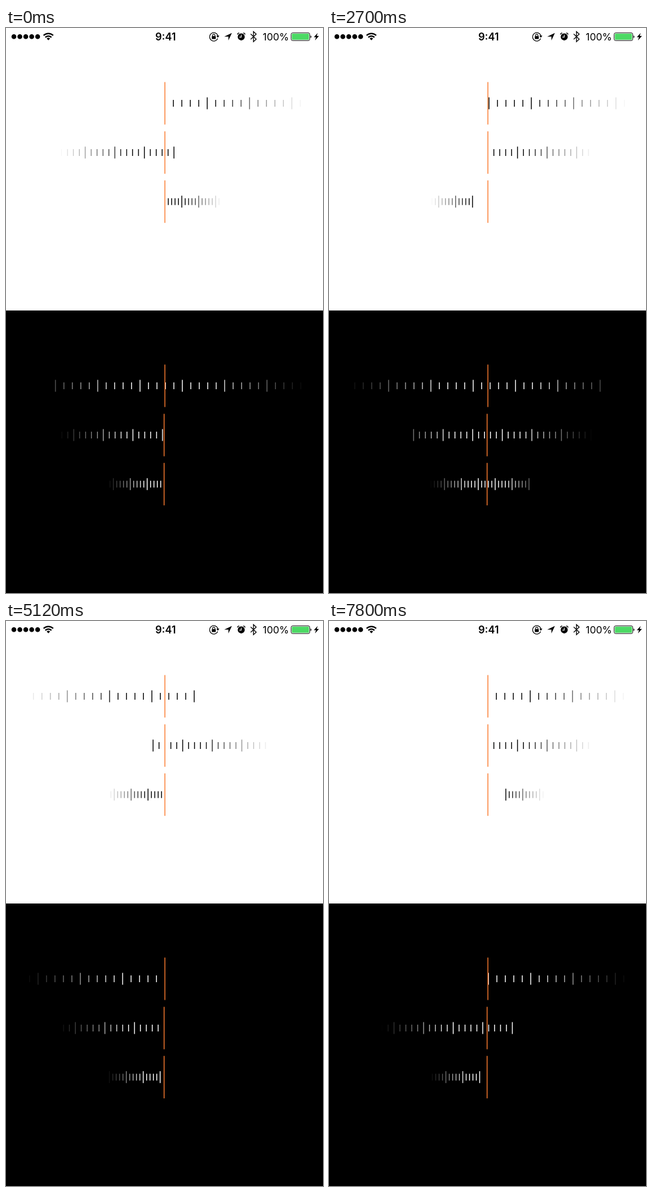
Recreate the animation shown at these times as an HTML page with a canvas. Size 561 by 998 pixels, loop 7900 ms.

```html
<!DOCTYPE html>
<html lang="en">
<head>
<meta charset="utf-8">
<title>Ruler sliders</title>
<style>
  html, body { margin: 0; width: 100%; height: 100%; overflow: hidden; background: #fff; }
  canvas, svg { position: absolute; left: 0; top: 0; display: block; }
  text { font-family: Inter, Roboto, sans-serif; }
</style>
</head>
<body>
<canvas id="stage" width="561" height="998"></canvas>
<svg width="561" height="32" viewBox="0 0 561 32">
  <path d="M14 15.3H57" stroke="#000" stroke-width="8.6" stroke-linecap="round" stroke-dasharray="0 10.5"/>
  <g fill="none" stroke="#000" stroke-width="2.5">
    <path d="M66.5 13.2a12.2 12.2 0 0 1 17 0M69.6 16.5a7.8 7.8 0 0 1 10.8 0"/>
    <path d="M72 18.6a4.5 4.5 0 0 1 6 0L75 21.7Z" fill="#000" stroke="none"/>
  </g>
  <text x="282.5" y="21.8" font-size="18" font-weight="600" text-anchor="middle">9:41</text>
  <!-- rotation lock -->
  <path d="M374.6 18.5A7.4 7.4 0 1 1 375 14" fill="none" stroke="#000" stroke-width="1.2"/>
  <path d="M372.2 13.6h5.4l-2.7 3.6Z"/>
  <rect x="364.2" y="14.2" width="7" height="5.2" rx=".6"/>
  <path d="M365.7 14.5v-1.7a2 2 0 0 1 4 0v1.7" fill="none" stroke="#000" stroke-width="1.2"/>
  <!-- location -->
  <path d="M399.8 8.8L393.6 22V15.2H386.2Z"/>
  <!-- alarm -->
  <circle cx="416.3" cy="15.7" r="6.2"/>
  <path d="M409.6 11.6a2.6 2.6 0 0 1 3.2-2.6M423 11.6a2.6 2.6 0 0 0-3.2-2.6" fill="none" stroke="#000" stroke-width="1.5"/>
  <path d="M416.3 11.8v4.4h-3.4" fill="none" stroke="#fff" stroke-width="1.2"/>
  <!-- bluetooth -->
  <path d="M433 10.6l9.8 9.2-4.9 4.4V6.4l4.9 4.4-9.8 9.2" fill="none" stroke="#000" stroke-width="1.4"/>
  <text x="454.3" y="21.8" font-size="17.5">100%</text>
  <rect x="504.6" y="8.6" width="33" height="13.6" rx="2.6" fill="none" stroke="#000" stroke-width="1"/>
  <rect x="506" y="10" width="30.2" height="10.8" rx="1.3" fill="#4cd964"/>
  <path d="M538.9 13.1a2.5 2.5 0 0 1 0 4.6Z"/>
  <path d="M551.6 8.7L544.8 16.3H548.6L546.8 21.9L553.8 14.1H549.9Z"/>
</svg>
<script>
const ctx = document.getElementById('stage').getContext('2d');
const LOOP = 7900, END = 7800, LAST_TICK = 50, LINE = 1.5;
const times = [0, 1000, 2700, 3740, 5120, 6720, END];

// Spacing and fade radius for the three ruler sizes
const sizes = [[14.97, 248], [10.47, 187], [5.98, 101]];

// Ruler value, in ticks, at each of the times above; x is the cursor's left edge
const rulers = [
  { y: 133, size: 0, x: 280.5, values: [0, 47.24, -.13, 0, 46.54, -.2, 0] },
  { y: 220, size: 1, x: 280.5, values: [48.47, 40.07, 0, 52.2, 2, 0, 0] },
  { y: 306.7, size: 2, x: 280.5, values: [0, 0, 54.55, 50, 50, 50, -5.3] },
  { y: 632, size: 0, x: 280.5, dark: true, values: [12.94, 50.27, 36.74, 50.38, 50, 7.43, -.06] },
  { y: 719, size: 1, x: 279, dark: true, values: [50.27, 40.49, 12.43, 8.67, 50, 0, 45.73] },
  { y: 805.7, size: 2, x: 279, dark: true, values: [50, 8.4, 37.6, 36.5, 51.17, 12.4, 52.2] }
];

function valueAt(values, t) {
  let i = 0;
  while (i < times.length - 2 && t >= times[i + 1]) i++;
  const p = (t - times[i]) / (times[i + 1] - times[i]);
  return values[i] + (values[i + 1] - values[i]) * p * p * (3 - 2 * p);
}

function bar(x, y, width, height, color) {
  ctx.fillStyle = color;
  ctx.fillRect(x, y - height / 2, width, height);
}

function drawRuler({ y, size, x, dark, values }, t) {
  const [gap, radius] = sizes[size];
  const value = valueAt(values, t);
  for (let k = 0; k <= LAST_TICK; k++) {
    const d = (k - value) * gap;
    if (Math.abs(d) >= radius) continue;
    ctx.globalAlpha = Math.min(1, 1.5 * (1 - Math.abs(d) / radius));
    bar(x + d, y, LINE, k % 5 ? 12 : 21, dark ? '#fff' : '#000');
  }
  ctx.globalAlpha = 1;
  // Clear whole pixels first so no tick shows through the cursor's soft edge
  bar(Math.floor(x), y, 2, 75, dark ? '#000' : '#fff');
  bar(x, y, LINE, 75, '#fb7a2e');
}

function draw(now) {
  const t = Math.min(Math.floor(now % LOOP / 20) * 20, END);
  ctx.fillStyle = '#fff';
  ctx.fillRect(0, 0, 561, 499);
  ctx.fillStyle = '#000';
  ctx.fillRect(0, 499, 561, 499);
  for (const ruler of rulers) drawRuler(ruler, t);
}

let start;
function frame(now) {
  start ??= now;
  draw(now - start);
  requestAnimationFrame(frame);
}
draw(0);
requestAnimationFrame(frame);
</script>
</body>
</html>
```
